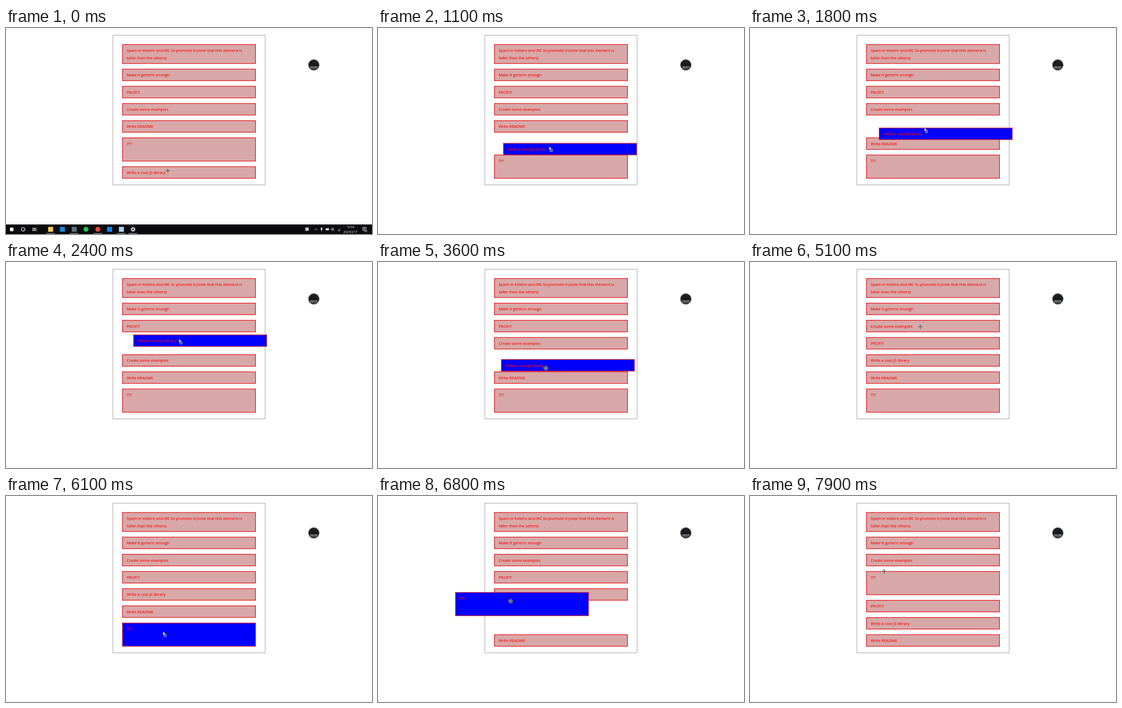
These frames come from a looping animation (690x388 px, 8 s). An HTML page:

```html
<!DOCTYPE html>
<html lang="en">
<head>
<meta charset="utf-8">
<title>Sortable list</title>
<style>
  html, body { margin: 0; width: 100%; height: 100%; overflow: hidden; background: #fff; }
  svg { display: block; width: 690px; height: 388px; }
  text { font-family: "Open Sans", "Noto Sans", sans-serif; }
  .row rect { fill: #d8a8a8; stroke: #e3161d; stroke-width: 1.25; }
  .row text { font-size: 7.45px; fill: #f00; stroke: #f00; stroke-width: .08; }
  .row.drag rect { fill: #00f; stroke: #d01a30; }
  .row.drag text { stroke-width: .2; }
  .bar text { font-size: 5.6px; fill: #fff; text-anchor: middle; }
  .line { fill: none; stroke: #fff; stroke-width: .8; }
</style>
</head>
<body>
<svg viewBox="0 0 690 388">
  <defs>
    <linearGradient id="dial" x2="0" y2="1">
      <stop offset="0" stop-color="#222527"/>
      <stop offset=".55" stop-color="#14191c"/>
      <stop offset=".65" stop-color="#303030"/>
      <stop offset="1" stop-color="#3a3a3a"/>
    </linearGradient>
  </defs>
  <rect x="201.5" y="13.5" width="287" height="282" fill="#fff" stroke="#9c9c9c" stroke-width=".9"/>
  <g id="list"></g>

  <circle cx="580.3" cy="69.6" r="10.2" fill="url(#dial)" stroke="#777" stroke-width="1"/>
  <text id="clock" x="580.3" y="75.9" font-size="5.1" fill="#eee" text-anchor="middle">00:00</text>

  <g id="bar" class="bar">
    <rect y="370" width="690" height="18" fill="#0b0b0d"/>
    <rect x="7.5" y="376" width="6.6" height="6.6" fill="#fff"/>
    <circle class="line" cx="32.3" cy="379.2" r="3.2" style="stroke-width:1.1"/>
    <path class="line" d="M50.5 376v1.2h4.5v-1.2M50.5 382.6v-1.2h4.5v1.2M50.5 378.2h4.5v2.2h-4.5zM57 376v6.6"/>
    <g id="apps"></g>
    <circle class="line" cx="239.6" cy="379.2" r="3.6" style="stroke-width:1.6;stroke-dasharray:1.6 1.2"/>
    <circle class="line" cx="239.6" cy="379.2" r="2.3" style="stroke-width:1.3"/>
    <path d="M76 387h16M120 387h16M165 387h16M209 387h16M231 387h16" stroke="#8fb7d3" stroke-width="1"/>
    <rect x="564.5" y="375.8" width="6" height="6" fill="#eee"/>
    <path d="M565.5 377.5h4M565.5 379.3h4" stroke="#333" stroke-width=".6"/>
    <path class="line" d="M581.8 380.6l2.6-2.6 2.6 2.6"/>
    <path d="M593.6 376h2.6v4h-2.6zM594.4 380h1v2.8h-1z" fill="#fff"/>
    <path d="M602.8 377.2h6v3.8h-6z" fill="#ddd"/>
    <path class="line" d="M613.2 378.3h1.2l1.6-1.6v5l-1.6-1.6h-1.2zM617.4 377.5q1.4 1.7 0 3.4"/>
    <path d="M624.5 382.4l5.4-5.4v5.4z" fill="#777"/>
    <text x="649.3" y="377.3">19:54</text>
    <text x="649.3" y="386">2023/2/17</text>
    <path class="line" d="M672.5 375.6h6.4v5.4h-2.2l-1.4 1.6v-1.6h-2.8zM674 377.4h3.4M674 379.1h3.4"/>
    <circle cx="678.8" cy="382.2" r="2.6" fill="#555"/>
    <text x="678.8" y="383.8" style="font-size:4px">1</text>
  </g>

  <g id="pointer">
    <path id="move" fill="#333" stroke="#eee" stroke-width=".5"
      d="M0-4.6L2-2.4H.8V-.8H2.4V-2L4.6 0 2.4 2V.8H.8V2.4H2L0 4.6-2 2.4H-.8V.8H-2.4V2L-4.6 0-2.4-2V-.8H-.8V-2.4H-2z"/>
    <g id="arrow">
      <path d="M0 0V6.4L1.5 5 2.5 7.2 3.5 6.8 2.6 4.7H4.5z" fill="#fff" stroke="#222" stroke-width=".4"/>
      <rect id="badge" x="1.9" y="5.8" width="4" height="3.4" fill="#224" stroke="#eee" stroke-width=".8"/>
    </g>
    <g id="nodrop">
      <circle r="4.3" fill="#ccc"/>
      <circle r="3.2" fill="#bbb" stroke="#333" stroke-width="1.2"/>
      <path d="M-2.2-2.2L2.2 2.2M-2.2 2.2L2.2-2.2" stroke="#333" stroke-width=".9"/>
    </g>
  </g>
</svg>
<script>
const LOOP = 8000, STEP = 100, LEFT = 219, TOP = 30.5, GAP = 9.35;
const NS = "http://www.w3.org/2000/svg";
const $ = id => document.getElementById(id);

const items = [
  "Spam in Kelviro and IRC to promote it (note that this element is\ntaller than the others)",
  "Make it generic enough", "PROFIT", "Create some examples",
  "Write README", "???", "Write a cool JS library"
].map(text => ({ lines: text.split("\n"), h: text === "???" ? 45 : text.includes("\n") ? 37 : 23 }));

// pointer moves: start, end, x, y
const start = { x: 305, y: 269 };
const moves = [
  [300, 850, 310, 266], [850, 1000, 322, 225], [1000, 1500, 329, 206],
  [1500, 2000, 329, 178], [2000, 2300, 326, 145], [3000, 3700, 316, 203],
  [3900, 4100, 317.5, 153], [4100, 4300, 323, 139], [4600, 4900, 321, 122],
  [5400, 5800, 323.5, 255.5], [6000, 6100, 296, 255], [6100, 6700, 250, 198],
  [6800, 7600, 253, 142]
];

// mouse button held down: from, to
const presses = [[300, 3700], [4100, 5000], [5900, 7700]];

function add(parent, tag, attrs) {
  const el = parent.appendChild(document.createElementNS(NS, tag));
  for (const key in attrs) el.setAttribute(key, attrs[key]);
  return el;
}

for (const item of items) {
  item.el = add($("list"), "g", { class: "row" });
  add(item.el, "rect", { x: .6, y: .6, width: 250.8, height: item.h - 1.2 });
  item.lines.forEach((line, i) => {
    add(item.el, "text", { x: 8.4, y: 14.6 + 13.7 * i }).textContent = line;
  });
}

const appColors = ["#f3cb5c", "#1686dc", "#55757b", "#20c05c", "#e5483b", "#1784ee", "#a9d3f1"];
appColors.forEach((fill, i) => {
  const round = i === 3 || i === 4;
  add($("apps"), "rect", { x: 79.4 + 22.25 * i, y: 374.6, width: 9.4, height: 9.2, rx: round ? 4.7 : 0, fill });
});

function pointerAt(t) {
  let { x, y } = start;
  for (const [from, to, x1, y1] of moves) {
    if (t <= from) break;
    const k = Math.min(1, (t - from) / (to - from));
    const ease = k * k * (3 - 2 * k);
    x += (x1 - x) * ease;
    y += (y1 - y) * ease;
  }
  return { x, y };
}

function layout(order) {
  let y = TOP;
  return order.map(item => {
    const row = { item, y };
    y += item.h + GAP;
    return row;
  });
}

const rowAt = (rows, y) => rows.findIndex(r => y >= r.y && y <= r.y + r.item.h);

// Play the drags once: a held item takes the place of each row the pointer enters.
function simulate() {
  const frames = [];
  let order = [...items], held = null, last = start;
  for (let t = 0; t < LOOP; t += STEP) {
    const pos = pointerAt(t);
    const down = presses.some(([from, to]) => t >= from && t < to);
    let rows = layout(order), hit = rowAt(rows, pos.y);

    if (!down) held = null;
    else if (!held) {
      const { item, y } = rows[hit];
      held = { item, dx: pos.x - LEFT, dy: pos.y - y };
    } else if (hit >= 0) {
      const index = order.indexOf(held.item);
      if ((hit - index) * (pos.y - last.y) > 0) {
        order = order.filter(item => item !== held.item);
        order.splice(hit, 0, held.item);
        rows = layout(order);
        hit = rowAt(rows, pos.y);
      }
    }
    // the dragged box trails the pointer by one step
    const ghost = held && { item: held.item, x: last.x - held.dx, y: last.y - held.dy };
    frames.push({ pos, rows, ghost, over: hit >= 0 });
    last = pos;
  }
  return frames;
}

const place = (el, x, y) => el.setAttribute("transform", `translate(${x} ${y})`);
const show = (el, on) => el.setAttribute("visibility", on ? "visible" : "hidden");

function draw(t, { pos, rows, ghost, over }) {
  for (const { item, y } of rows) {
    item.el.setAttribute("class", "row");
    place(item.el, LEFT, y);
  }
  if (ghost) {
    const { el } = ghost.item;
    el.setAttribute("class", "row drag");
    place(el, ghost.x, ghost.y);
    if ($("list").lastChild !== el) $("list").append(el);
  }

  place($("pointer"), pos.x, pos.y);
  show($("move"), !ghost && over);
  show($("arrow"), !ghost !== over);
  show($("badge"), ghost && over);
  show($("nodrop"), ghost && !over);

  $("clock").textContent = "00:0" + Math.floor((t + 250) / 1000);
  place($("bar"), 0, 18 * Math.min(1, t / 200));
}

const frames = simulate();

function tick() {
  const i = Math.floor(performance.now() % LOOP / STEP);
  draw(i * STEP, frames[i]);
  requestAnimationFrame(tick);
}
tick();
</script>
</body>
</html>
```
